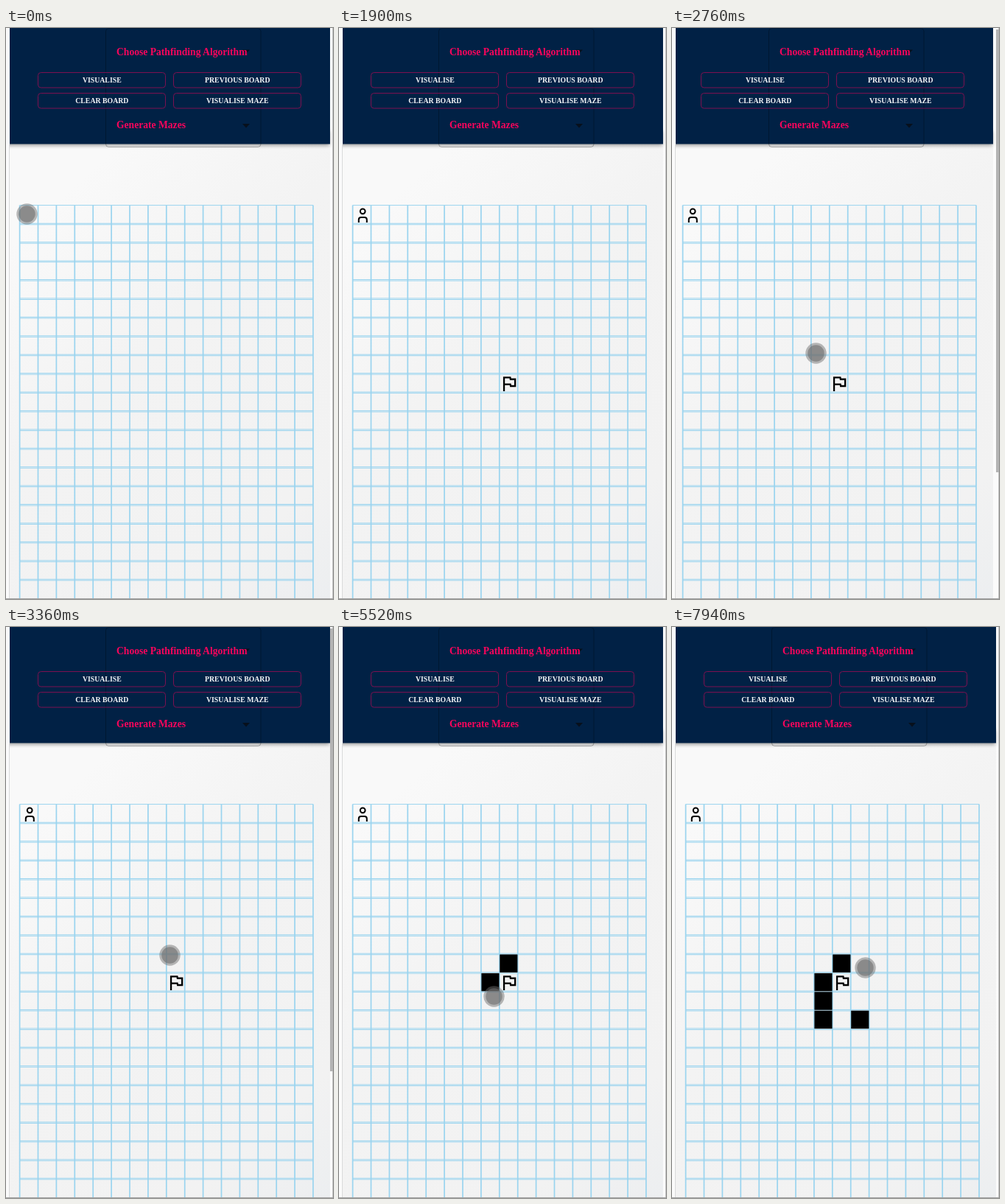
An HTML page for the animation above (8 s loop, 444 by 775 pixels).

```html
<!DOCTYPE html>
<html lang="en">
<head>
<meta charset="utf-8">
<title>Pathfinding board</title>
<style>
  html, body { margin: 0; width: 100%; height: 100%; overflow: hidden; background: #fbfbfb; }
  svg { display: block; width: 444px; height: 775px; }
  text { font-family: "Liberation Serif", "Noto Serif", serif; font-weight: 700; }
  .title { font-size: 13.6px; fill: #f8055c; }
  .label { font-size: 9.8px; fill: #f6f6f8; text-anchor: middle; }
  .button { fill: none; stroke: #7c1150; }
  .grid { fill: none; stroke: #9ad4ef; }
  .icon { fill: none; stroke: #000; stroke-width: 2; }
</style>
</head>
<body>
<svg viewBox="0 0 444 775">
  <defs>
    <linearGradient id="paper" gradientUnits="userSpaceOnUse" x1="0" y1="300" x2="444" y2="775">
      <stop offset="0" stop-color="#f9f9f9"/>
      <stop offset=".35" stop-color="#f3f3f3"/>
      <stop offset=".8" stop-color="#f2f2f2"/>
      <stop offset="1" stop-color="#eceef0"/>
    </linearGradient>
    <filter id="blur" x="-10%" y="-50%" width="120%" height="200%"><feGaussianBlur stdDeviation="2.5"/></filter>
    <clipPath id="view"><rect x="5" width="439" height="775"/></clipPath>
  </defs>
  <rect width="444" height="775" fill="#fbfbfb"/>
  <g clip-path="url(#view)">
    <g id="page">
      <rect y="150" width="440" height="625" fill="url(#paper)"/>
      <rect x="-10" y="140" width="449" height="19.5" opacity=".38" filter="url(#blur)"/>
      <rect x="-10" width="450" height="157.5" fill="#012145"/>
      <rect x="135.5" y=".5" width="210.5" height="161" rx="4" fill="none" stroke="#000" stroke-opacity=".28"/>
      <path d="M321 29.5h10l-5 5zM321 130h10l-5 5.5z" fill="#07101c"/>
      <text class="title" x="150" y="37">Choose Pathfinding Algorithm</text>
      <text class="title" x="150" y="136">Generate Mazes</text>
      <g id="buttons"></g>
      <g id="grid" class="grid"></g>
      <g id="walls"></g>
      <g id="person" class="icon">
        <circle cx="32.2" cy="248.8" r="3.4"/>
        <path d="M26.8 264V260.2Q26.8 257 30 257H34.6Q37.8 257 37.8 260.2V264"/>
      </g>
      <path id="flag" transform="translate(217.1 468.6) scale(1.16)"
        d="M12.4 6l.4 2H18v6h-3.4l-.4-2H7V6zM14 4H5v17h2v-7h5.6l.4 2h7V6h-5.6z"/>
    </g>
  </g>
  <path d="M4.5 158V775" stroke="#d9dadb"/>
  <path d="M443.5 0V775" stroke="#c4c4c4"/>
  <path d="M0 774.5H444" stroke="#a3a3a3"/>
  <rect id="bar" x="440" y="2" width="4" height="601" fill="#b4b4b4"/>
  <g id="touch" fill="#6e6e6e">
    <circle cx=".5" cy=".5" r="14.2" fill-opacity=".48"/>
    <circle cx=".5" cy=".5" r="11.2" fill-opacity=".6"/>
  </g>
</svg>
<script>
const LOOP = 8000, X0 = 18.6, Y0 = 240.6, CW = 24.9, RH = 25.42;
const STEP = 145; // time between touch samples
const el = id => document.getElementById(id);
const clamp = v => Math.min(1, Math.max(0, v));

el('buttons').innerHTML = ['VISUALISE', 'PREVIOUS BOARD', 'CLEAR BOARD', 'VISUALISE MAZE'].map((name, i) => {
  const x = 43.5 + i % 2 * 184, y = 60.5 + (i >> 1) * 28;
  return `<rect class="button" x="${x}" y="${y}" width="173" height="20.5" rx="4"/>
    <text class="label" x="${x + 86.8}" y="${y + 13.5}">${name}</text>`;
}).join('');

let cols = '', rows = `M${X0} ${Y0}h${16 * CW}`;
for (let c = 0; c <= 16; c++) cols += `M${X0 + c * CW} ${Y0}V775`;
for (let r = 1; r <= 20; r++)
  for (const d of [-.8, .8]) rows += `M${X0} ${Y0 + r * RH + d}h${16 * CW}`;
el('grid').innerHTML = `<path d="${cols}" stroke-width="1.7"/><path d="${rows}"/>`;

function addWall(x, y) {
  const c = Math.floor((x - X0) / CW), r = Math.floor((y - Y0) / RH);
  el('walls').insertAdjacentHTML('beforeend',
    `<rect x="${X0 + c * CW + .5}" y="${Y0 + r * RH + .5}" width="${CW - .8}" height="${RH - 1}"/>`);
  return el('walls').lastChild;
}

const touches = [], marks = [];
const drag = (down, up, x, y, dx, dy, delay = 0) => touches.push({ down, up, x, y, dx, dy, delay });
const tap = (down, up, x, y) => drag(down, up, x, y, 0, 0);
const mark = (at, node) => marks.push({ at, node });

// A wall fills the cell under the point where the finger lifts.
function build(at, down, up, x, y, dy = 0, delay = 0) {
  drag(down, up, x, y, 0, dy, delay);
  mark(at, addWall(x, y + dy));
}

tap(0, 290, 28, 252);
mark(290, el('person'));
tap(410, 1260, 221, 495);
drag(1260, 1510, 207, 485, -4, 0);
mark(1640, el('flag'));
tap(1760, 1900, 240, 445);
const swipe = { down: 2310, up: 2910, x: 221, y: 445, dx: -26, dy: -4, delay: 0 };
touches.push(swipe);
build(4180, 3060, 3480, 222, 445);
build(5520, 4300, 5370, 206, 455, 22, 285);
build(6190, 5520, 6190, 210, 501);
build(6740, 6190, 6340, 210, 530);
build(7490, 6860, 7490, 258, 535);
drag(7630, LOOP, 261, 486, 1, -25);

const active = (g, t) => t >= g.down && t < g.up;

function position(g, t) {
  const n = Math.floor((t - g.down - g.delay) / STEP);
  const k = 1 - (1 - clamp(n / 3)) ** 3;
  return [Math.round(g.x + g.dx * k), Math.round(g.y + g.dy * k)];
}

// The page gives way a little under the sideways swipe.
const pageShift = t => active(swipe, t) ? Math.min(4, 1 + (swipe.x - position(swipe, t)[0]) / 6) : 0;

const show = (node, on) => node.setAttribute('visibility', on ? 'visible' : 'hidden');

function draw(t) {
  const touch = touches.find(g => active(g, t));
  show(el('touch'), touch);
  if (touch) el('touch').setAttribute('transform', `translate(${position(touch, t)})`);
  el('page').setAttribute('transform', `translate(${-pageShift(t)})`);
  el('bar').setAttribute('opacity', t < swipe.down ? 0 : clamp((3600 - t) / 240));
  for (const m of marks) show(m.node, t >= m.at);
}

const start = performance.now();
function tick() {
  draw((performance.now() - start) % LOOP);
  requestAnimationFrame(tick);
}
tick();
</script>
</body>
</html>
```
